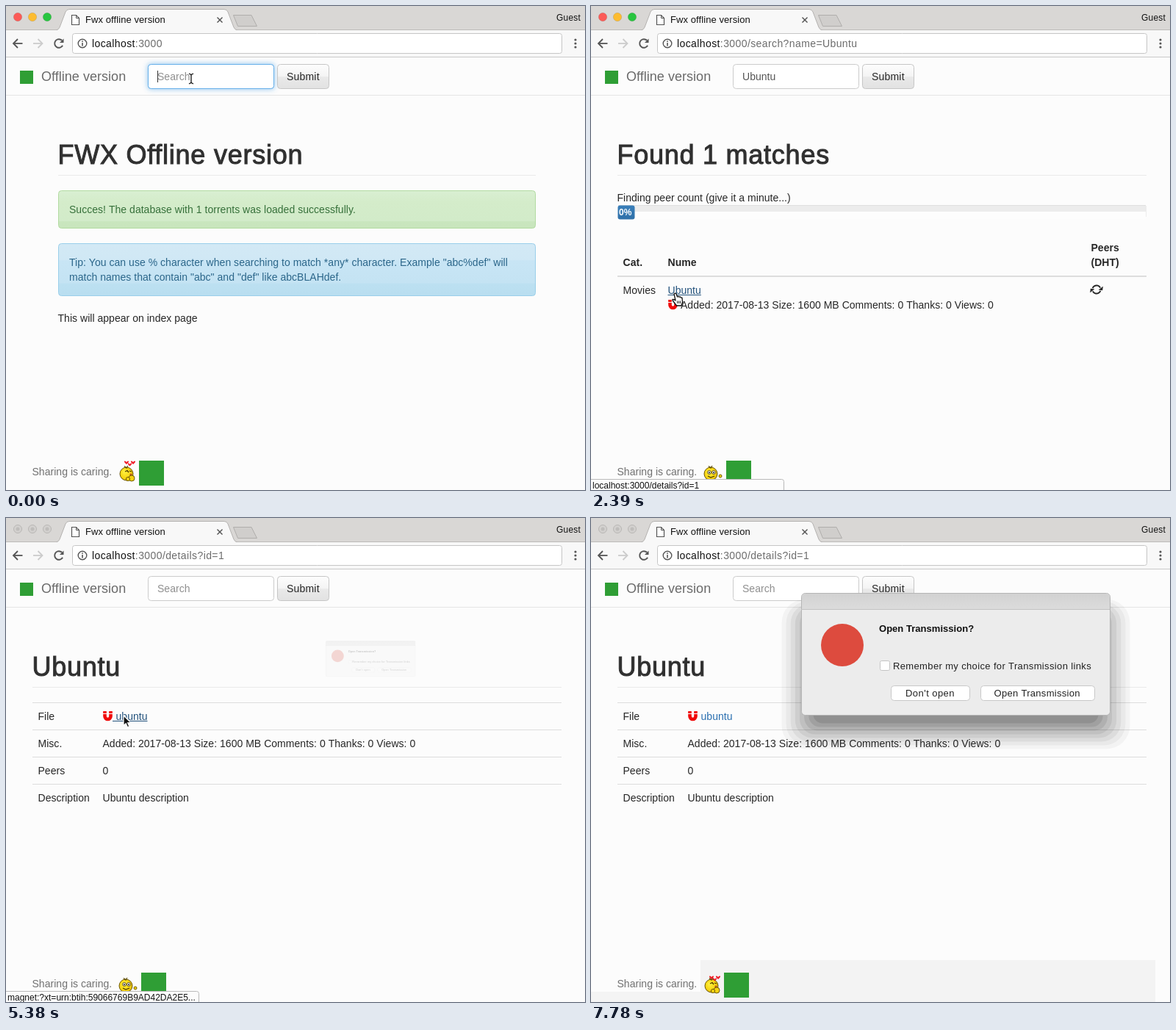
An HTML page with a canvas for the animation above (7880 ms loop, 788 by 659 pixels).

```html
<!DOCTYPE html>
<html lang="en">
<head>
<meta charset="utf-8">
<title>Offline version demo</title>
<style>
html, body { margin: 0; width: 100%; height: 100%; overflow: hidden; background: #fcfcfc; }
canvas { display: block; width: 788px; height: 659px; }
</style>
</head>
<body>
<canvas id="stage" width="788" height="659"></canvas>
<script>
const g = document.getElementById('stage').getContext('2d');
const LOOP = 7880, STEP = 149.3, LAST = 52;
const FONT = '"Liberation Sans", Arial, sans-serif';
const INK = '#262626', LINK = '#2a6fb0';

// ---------- helpers ----------
function text(s, x, y, size = 14, color = INK, bold = false, gap = 0.03) {
  g.font = (bold ? 'bold ' : '') + size + 'px ' + FONT;
  g.letterSpacing = gap + 'px';
  g.fillStyle = color;
  g.fillText(s, x, y);
  return g.measureText(s).width;
}

function heading(s, x) {
  text(s, x, 215, 36, '#303030', false, 0.75);
  g.strokeStyle = '#303030';
  g.lineWidth = 1;
  g.strokeText(s, x, 215);
}

function rect(x, y, w, h, color) {
  g.fillStyle = color;
  g.fillRect(x, y, w, h);
}

function box(x, y, w, h, r, fill, stroke) {
  g.beginPath();
  g.roundRect(x + 0.5, y + 0.5, w - 1, h - 1, r);
  if (fill) { g.fillStyle = fill; g.fill(); }
  if (stroke) { g.strokeStyle = stroke; g.lineWidth = 1; g.stroke(); }
}

function disc(x, y, r, fill, stroke, w = 1) {
  g.beginPath();
  g.arc(x, y, r, 0, Math.PI * 2);
  if (fill) { g.fillStyle = fill; g.fill(); }
  if (stroke) { g.strokeStyle = stroke; g.lineWidth = w; g.stroke(); }
}

function poly(p, fill, stroke, w = 1, open = false) {
  g.beginPath();
  for (let i = 0; i < p.length; i += 2) g.lineTo(p[i], p[i + 1]);
  if (!open) g.closePath();
  if (fill) { g.fillStyle = fill; g.fill(); }
  if (stroke) { g.strokeStyle = stroke; g.lineWidth = w; g.stroke(); }
}

function bands(y, h, ...stops) {
  const grad = g.createLinearGradient(0, y, 0, y + h);
  stops.forEach(([at, c]) => grad.addColorStop(at, c));
  return grad;
}

function at(x, y, draw, scale = 1, turn = 0) {
  g.save();
  g.translate(x, y);
  g.rotate(turn);
  g.scale(scale, scale);
  draw();
  g.restore();
}

const mix = (a, b, k) => a + (b - a) * k;

// ---------- browser ----------
function lights(active) {
  ['#fc5b57', '#fdbc30', '#28c53f'].forEach((c, i) => {
    const x = 16 + i * 20;
    if (active) disc(x, 15, 5.7, c, 'rgba(0,0,0,.1)');
    else {
      disc(x, 15, 5.5, '#d3d1cf', '#b9b7b5');
      disc(x, 15, 2.5, '#bfbdbb');
    }
  });
}

function arc(x, y, r, from, to, color, w) {
  g.beginPath();
  g.arc(x, y, r, from, to);
  g.strokeStyle = color;
  g.lineWidth = w;
  g.stroke();
}

function browser(n, path, active) {
  rect(0, 0, 788, 33, '#d9d7d5');
  rect(0, 32, 788, 1, '#bdbbb9');
  lights(active);
  poly([309.5, 12.5, 334, 12.5, 341.5, 27.5, 315.5, 27.5], '#d0cecc', '#b0aeac');
  g.beginPath();
  g.moveTo(68, 33);
  g.quadraticCurveTo(71.5, 32.5, 73, 29);
  g.lineTo(81, 8);
  g.quadraticCurveTo(82.5, 4.5, 86, 4.5);
  g.lineTo(297, 4.5);
  g.quadraticCurveTo(300.5, 4.5, 302, 8);
  g.lineTo(310, 29);
  g.quadraticCurveTo(311.5, 32.5, 315, 33);
  g.fillStyle = '#f8f8f8';
  g.fill();
  g.strokeStyle = '#b4b2b0';
  g.lineWidth = 1;
  g.stroke();
  rect(0, 33, 788, 37, '#f8f8f8');
  rect(0, 69, 788, 1, '#c9c9c9');

  if (n >= 4 && n < 7) arc(94, 19, 5.5, n * 1.7, n * 1.7 + 4.2, '#7d7d7d', 1.8);
  else {
    poly([89.5, 12.5, 95.5, 12.5, 99.5, 16.5, 99.5, 25.5, 89.5, 25.5], '#fff', '#555', 1.2);
    poly([95.5, 12.5, 95.5, 16.5, 99.5, 16.5], null, '#555', 1, true);
  }
  text('Fwx offline version', 108, 23, 13, '#111', false, 0.08);
  text('Guest', 749, 20, 12, '#111', false, 0.2);
  poly([287.5, 15.5, 294.5, 22.5], null, '#555', 1.4, true);
  poly([294.5, 15.5, 287.5, 22.5], null, '#555', 1.4, true);

  poly([22.5, 51, 10, 51], null, '#555', 1.8, true);
  poly([16, 45, 10, 51, 16, 57], null, '#555', 1.8, true);
  poly([37, 51, 49.5, 51], null, '#ccc', 1.8, true);
  poly([43.5, 45, 49.5, 51, 43.5, 57], null, '#ccc', 1.8, true);
  arc(72, 51, 5.8, 0.5, 5.5, '#555', 1.9);
  poly([78.5, 44.5, 78.5, 50, 73, 50], '#555');

  box(90, 37, 667, 28, 3, '#fff', '#c6c6c6');
  disc(104, 51, 5.8, null, '#555', 1.4);
  rect(103.2, 50, 1.6, 4.5, '#555');
  rect(103.2, 47.3, 1.6, 1.6, '#555');
  const w = text('localhost', 117, 56, 14, '#111', false, 0.4);
  text(':3000' + path, 117 + w, 56, 14, '#6c6c6c', false, 0.4);
  for (let i = 0; i < 3; i++) disc(775, 46 + i * 5, 1.6, '#555');
}

function navbar(typed, focus, caret) {
  rect(0, 70, 788, 51, '#fcfcfc');
  rect(0, 121, 788, 1, '#e5e5e5');
  rect(19, 88, 18, 18, '#2f9e35');
  text('Offline version', 48, 102, 18, '#6a6a6a');
  if (focus) {
    g.save();
    g.shadowColor = 'rgba(102,175,233,.7)';
    g.shadowBlur = 7;
    box(193, 79, 172, 34, 4, '#fff', '#66afe9');
    g.restore();
  }
  box(193, 79, 172, 34, 4, '#fff', focus ? '#66afe9' : '#ccc');
  text(typed || 'Search', 206, 101, 14, typed ? '#555' : '#8f8f8f');
  if (caret) rect(206 + g.measureText(typed).width, 88, 1, 16, '#333');
  box(369, 79, 71, 34, 4, bands(79, 34, [0, '#fdfdfd'], [0.5, '#f4f4f4'], [0.52, '#e9e9e9'], [1, '#e2e2e2']), '#c6c6c6');
  text('Submit', 382, 101, 14, INK, false, 0.2);
}

// ---------- icons ----------
function magnet(x, y) {
  at(x, y, () => {
    g.beginPath();
    g.moveTo(2.5, 4);
    g.lineTo(2.5, 7);
    g.arc(6.5, 7, 4, Math.PI, 0, true);
    g.lineTo(10.5, 4);
    g.strokeStyle = '#f00a0a';
    g.lineWidth = 4.6;
    g.stroke();
    rect(0.2, 0, 4.6, 3, '#f00a0a');
    rect(8.2, 0, 4.6, 3, '#f00a0a');
  });
}

function refresh(x, y, turn) {
  for (const half of [0, Math.PI]) {
    at(x, y, () => {
      arc(0, 0, 5.6, 3.3, 5.7, INK, 2);
      poly([8.2, -5.5, 8.2, 0, 2.6, 0], INK);
    }, 1, turn + half);
  }
}

function heart(x, y, size, color) {
  at(x, y, () => {
    g.beginPath();
    g.moveTo(0, 1);
    g.bezierCurveTo(-0.4, -0.9, -3, -0.6, -1.1, 1.3);
    g.lineTo(0, 2.4);
    g.lineTo(1.1, 1.3);
    g.bezierCurveTo(3, -0.6, 0.4, -0.9, 0, 1);
    g.fillStyle = color;
    g.fill();
  }, size);
}

function smiley(kiss, n) {
  const cx = kiss ? 164 : 163, cy = 637;
  const fill = g.createRadialGradient(cx - 3, cy - 3, 1, cx, cy, 10);
  fill.addColorStop(0, '#ffee3c');
  fill.addColorStop(0.7, '#f6d310');
  fill.addColorStop(1, '#c49a00');
  disc(cx, cy, 9, fill, '#6e5a08');
  poly([cx - 3, 626.5, cx, 629, cx + 2, 626], null, '#5d4c08', 1.2, true);
  if (kiss) {
    poly([162, 634, 165, 632.5, 167, 635], null, '#4a3a00', 1.3, true);
    poly([168, 633, 171, 634], null, '#4a3a00', 1.3, true);
    disc(170, 638, 1.6, '#b8541b');
    disc(171, 643, 4, '#f6d310', '#6e5a08');
    disc(166, 644, 2.6, '#f6d310', '#6e5a08');
  } else {
    const look = n % 4 < 2 ? 0 : 1;
    for (const x of [161, 167]) {
      disc(x, 635, 2.4, '#fff', '#4a3a00', 0.9);
      disc(x + look, 635.3, 1, '#222');
    }
    poly([159, 640, 163, 642, 168, 640], null, '#4a3a00', 1.2, true);
    disc(176, 640, 2, '#f6d310', '#6e5a08');
  }
}

function hearts(k) {
  const red = '#f0121f';
  if (k < 3) return heart(172, 628 - k * 0.5, 1, '#e8604a');
  if (k < 9) {
    const y = 624 - Math.max(0, k - 6) * 4;
    heart(164, y, 1.7, red);
    heart(173, y, 1.7, red);
    return heart(168.5, y + 3, 1.5, red);
  }
  heart(169, 618, 1.1, '#e23a3a');
  for (const x of [165, 172]) {
    heart(x, 623, 1.1, '#e23a3a');
    heart(x + 2, 627, 0.9, '#e8604a');
  }
}

function footer(n) {
  const kiss = n < 2 || (n >= 19 && n < 29) || n >= 46;
  text('Sharing is caring.', 35.5, 639, 14, '#707070');
  rect(kiss ? 181 : 184, 619, 34, 34, '#2f9e35');
  smiley(kiss, n);
  if (kiss) hearts(n < 2 ? 7 + n : n < 29 ? n - 19 : n - 46);
}

function statusBar(s) {
  box(-4, 644, 267, 20, 3, '#fcfcfc', '#b9b9b9');
  text(s, 2, 657, 12, '#111', false, 0);
}

// ---------- pages ----------
function indexPage() {
  heading('FWX Offline version', 70.5);
  rect(71, 230, 650, 1, '#eaeaea');
  box(71, 251, 650, 52, 4, bands(251, 52, [0, '#d9efd2'], [0.3, '#d4ecca'], [0.8, '#d2ebc9'], [0.82, '#c9e6be'], [1, '#c8e5bc']), '#b2dba1');
  text('Succes! The database with 1 torrents was loaded successfully.', 86, 282, 14, '#36703a');
  box(71, 323, 650, 72, 4, bands(323, 72, [0, '#d3e9f5'], [0.31, '#d0e8f5'], [0.33, '#c8e5f5'], [0.75, '#c4e3f3'], [0.77, '#bce0f1'], [1, '#b9def0']), '#9acfea');
  text('Tip: You can use % character when searching to match *any* character. Example "abc%def" will', 86, 354, 14, '#2b668a');
  text('match names that contain "abc" and "def" like abcBLAHdef.', 86, 374, 14, '#2b668a');
  text('This will appear on index page', 70.5, 430);
}

const STATS = 'Added: 2017-08-13 Size: 1600 MB Comments: 0 Thanks: 0 Views: 0';

function link(s, x, y, hover) {
  const color = hover ? '#23527c' : LINK;
  const w = text(s, x, y, 14, color);
  if (hover) rect(x, y + 1, w, 1, color);
}

function listPage(n, hover) {
  heading('Found 1 matches', 35.5);
  rect(36, 230, 720, 1, '#eaeaea');
  text('Finding peer count (give it a minute...)', 35.5, 266);
  box(36, 271, 720, 20, 4, '#fdfdfd');
  rect(37, 271, 718, 9, '#ececec');
  rect(37, 271, 718, 1, '#dfdfdf');
  rect(755, 272, 1, 15, '#ececec');
  box(36, 271, 24, 20, 3, bands(271, 20, [0, '#3a7fba'], [1, '#2f70a8']));
  text('0%', 38, 285, 12, '#fff', true);
  text('Cat.', 43.5, 354, 14, INK, true);
  text('Nume', 104.5, 354, 14, INK, true);
  text('Peers', 680.5, 334, 14, INK, true);
  text('(DHT)', 680.5, 354, 14, INK, true);
  rect(36, 367, 720, 2, '#ddd');
  text('Movies', 43.5, 392);
  link('Ubuntu', 104.5, 392, hover);
  magnet(105, 400);
  text(STATS, 122, 412);
  refresh(688, 386, (n - 9) * 0.47);
}

function detailsPage(n, hover) {
  const ready = n >= 21;
  heading('Ubuntu', 35.5);
  rect(36, 230, 720, 1, '#eaeaea');
  ['File', 'Misc.', 'Peers', 'Description'].forEach((s, i) => {
    rect(36, 251 + i * 37, 720, 1, '#ddd');
    text(s, 43.5, 275 + i * 37);
  });
  link('ubuntu', ready ? 149.5 : 145.5, 275, hover);
  if (hover) rect(145, 276, 5, 1, '#23527c');
  if (ready) magnet(132, 263);
  text(STATS, 131.5, 312);
  if (n >= 31) text('0', 131.5, 349);
  else if (ready) refresh(139, 343, Math.PI / 2 + (n - 28) * 0.47);
  text('Ubuntu description', 131.5, 386);
}

// ---------- dialog, drawn about its centre ----------
function shadow() {
  const count = 8;
  for (let i = count; i > 0; i--) {
    const k = i / count;
    const side = mix(-22, 27, k), top = mix(-50, -75, k), foot = 84 + mix(6, 46, k);
    box(-210 - side, top, 421 + side * 2, foot - top, mix(10, 32, k), `rgba(0,0,0,${mix(0.11, 0.035, k)})`);
  }
}

function panel() {
  box(-210, -83, 421, 167, 5, '#ececec', '#b5b5b5');
  g.beginPath();
  g.roundRect(-209, -82, 419, 22, [4, 4, 0, 0]);
  g.fillStyle = bands(-82, 22, [0, '#d2d2d2'], [1, '#dcdcdc']);
  g.fill();
  rect(-210, -61, 420, 1, '#c2c2c2');
  disc(-154, -12, 29, '#dd4b3e');
  text('Open Transmission?', -104, -30, 13, '#111', true);
  box(-103, 9, 14, 14, 2, '#fff', '#c4c4c4');
  text('Remember my choice for Transmission links', -85, 21, 13, '#222', false, 0.36);
  box(-88, 43, 108, 21, 4, '#fff', '#c8c8c8');
  text("Don't open", -68, 58, 13, '#222', false, 0.45);
  box(34, 43, 156, 21, 4, '#fff', '#c8c8c8');
  text('Open Transmission', 52.5, 58, 13, '#222', false, 0.3);
}

function showDialog(n) {
  if (n < 36) return;
  const s = [0.29, 0.8][n - 36] || 1;
  g.save();
  g.globalAlpha = [0.2, 0.7][n - 36] || 1;
  at(496, 185 + (1 - s) * 9, () => {
    if (s === 1) shadow();
    panel();
  }, s);
  g.restore();
}

// ---------- pointer ----------
const PATH = [
  [0, 252, 99], [10, 252, 99], [11, 236, 118], [16, 115, 391], [22, 115, 391],
  [28, 179, 305], [31, 160, 269], [38, 160, 269], [43, 500, 290], [45, 510.5, 319],
  [47, 600, 480], [50, 720, 675], [53, 720, 675]
];

function pointer(n) {
  const i = PATH.findIndex(p => p[0] > n);
  const [a, ax, ay] = PATH[i - 1], [b, bx, by] = PATH[i];
  const u = (n - a) / (b - a);
  const hand = (n >= 16 && n < 23) || (n >= 31 && n < 35);
  at(mix(ax, bx, u), mix(ay, by, u), n < 11 ? ibeam : hand ? finger : arrow);
}

function ibeam() {
  const p = [[-3, -7, 0, -5.5, 3, -7], [0, -5.5, 0, 5.5], [-3, 7, 0, 5.5, 3, 7]];
  p.forEach(q => poly(q, null, '#fff', 3, true));
  p.forEach(q => poly(q, null, '#111', 1.3, true));
}

function arrow() {
  poly([0, 0, 0, 13.5, 3.2, 10.7, 5.4, 15.8, 7.8, 14.8, 5.6, 9.8, 9.8, 9.6], '#111', '#fff', 1.2);
}

function finger() {
  g.lineJoin = 'round';
  poly([-2, 1, -0.5, 0, 1, 1, 2.5, 5, 4, 4.2, 5, 5.2, 6.5, 4.8, 7.5, 6, 9, 6.2, 9.5, 12, 8, 17, 1.5, 17, -3.5, 10.5, -4, 8.5, -2, 8.6, 0, 10], '#fff', '#111', 1.3);
  for (const x of [2.5, 4.5, 6.5]) poly([x, 10.5, x, 14], null, '#111', 0.9, true);
  g.lineJoin = 'miter';
}

// ---------- scene ----------
function draw(n) {
  const page = n < 6 ? 0 : n < 20 ? 1 : 2;
  const path = n < 6 ? '' : n < 19 ? '/search?name=Ubuntu' : '/details?id=1';
  const typed = n < 1 || page === 2 ? '' : n < 2 ? 'Ub' : 'Ubuntu';
  rect(0, 0, 788, 659, '#fcfcfc');
  browser(n, path, n < 35);
  navbar(typed, page === 0, page === 0 && n < 4);
  if (n >= 40) rect(0, 645, 263, 14, '#f4f4f4');
  if (n >= 50) rect(149, 602, 619, 57, '#f3f3f3');
  if (page === 0) indexPage();
  else if (page === 1) listPage(n, n >= 16);
  else detailsPage(n, n >= 31 && n < 39);
  footer(n);
  if (n >= 16 && n < 19) statusBar('localhost:3000/details?id=1');
  else if (n >= 19 && n < 21) statusBar('Waiting for localhost...');
  else if (n >= 31 && n < 40) statusBar('magnet:?xt=urn:btih:59066769B9AD42DA2E5...');
  showDialog(n);
  pointer(n);
}

function tick() {
  const t = performance.now() % LOOP;
  draw(Math.min(LAST, Math.floor(t / STEP)));
  requestAnimationFrame(tick);
}
tick();
</script>
</body>
</html>
```
